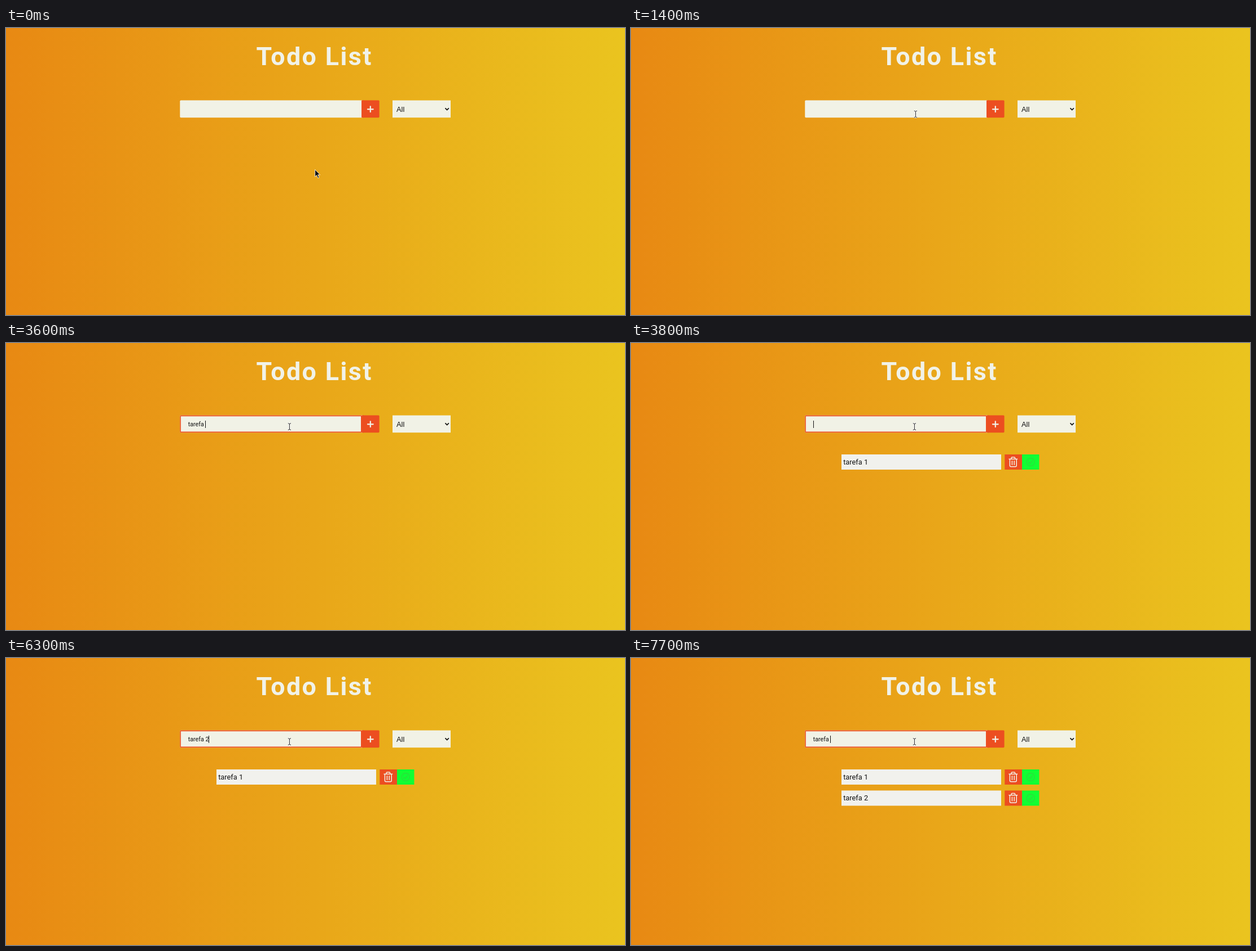
These frames come from a looping animation (1097 by 510 pixels, 8000 ms). An HTML page:

```html
<!DOCTYPE html>
<html lang="en">
<head>
<meta charset="utf-8">
<title>Todo List</title>
<style>
  html, body { margin: 0; width: 100%; height: 100%; overflow: hidden; }
  body { background: linear-gradient(to right, #e88913, #eac41f); }
  svg { display: block; width: 1097px; height: 510px; }
  text { font-family: Roboto, sans-serif; white-space: pre; }
  .title { font-size: 44.8px; font-weight: 700; letter-spacing: 2.4px; fill: #f1f2e8; }
  .field { fill: #f1f2e6; }
  .typed { font-size: 10.667px; fill: #111; }
  .option { font: 12.8px "Liberation Sans", Arial, sans-serif; fill: #111; }
  .label { font-size: 12.8px; fill: #111; }
  .accent { fill: #ec4e20; }
  .line { fill: none; stroke: #f1f2e8; stroke-width: 1.5; stroke-linecap: round; stroke-linejoin: round; }
</style>
</head>
<body>
<svg viewBox="0 0 1097 510">
  <defs>
    <g id="row">
      <rect x="373" width="283" height="27" fill="#f1f1ed"/>
      <rect class="accent" x="662.3" width="30.7" height="27"/>
      <rect x="693" width="30.4" height="27" fill="#11ff33"/>
      <path class="line" d="M670 8.2H684.6M674 8V6.4Q674 5 675.4 5H679.2Q680.6 5 680.6 6.4V8
        M671.4 8.4V19.8Q671.4 21.8 673.4 21.8H681.2Q683.2 21.8 683.2 19.8V8.4M675.4 11.4V18.4M679.2 11.4V18.4"/>
      <g fill="none" stroke="#2ddc3c" stroke-width="1.3" stroke-linecap="round">
        <circle cx="708.2" cy="13.5" r="7"/>
        <path d="M705 13.8L707.4 16.2L711.6 11"/>
      </g>
    </g>
  </defs>

  <text class="title" x="443.6" y="66">Todo List</text>

  <rect class="field" x="308.3" y="128.6" width="325" height="30.6" rx="1.6"/>
  <rect class="accent" x="630.2" y="128.6" width="31.4" height="30.6" rx="1.6"/>
  <rect class="accent" x="630.2" y="128.6" width="4" height="30.6"/>
  <path d="M645.8 139.4V149.2M640.9 144.3H650.7" stroke="#f1f2e8" stroke-width="2.2" stroke-linecap="round"/>

  <rect class="field" x="685" y="128.6" width="103" height="30.6"/>
  <text class="option" x="692" y="148.6">All</text>
  <path d="M778.4 142.3L781.6 145.6L784.8 142.3" fill="none" stroke="#111" stroke-width="1.7"/>

  <rect id="focus" x="309.1" y="129.4" width="320.7" height="29" rx="1" fill="none" stroke="#ec4e20" stroke-width="1.6"/>
  <text id="typed" class="typed" x="322.8" y="148.2"></text>
  <rect id="caret" y="138" width="1" height="13" fill="#111"/>

  <g id="first">
    <use href="#row" y="198"/>
    <text class="label" x="376.2" y="215.8">tarefa 1</text>
  </g>
  <g id="second">
    <use href="#row" y="235.5"/>
    <text class="label" x="376.2" y="253.3">tarefa 2</text>
  </g>

  <path id="arrow" d="M0 0V12.6L2.9 10L5.2 15L7.3 14.1L5.1 9.2H9Z" fill="#111" stroke="#fff" stroke-width=".8"/>
  <g id="beam" fill="none">
    <path d="M-2.6 -5.8Q0 -5.8 0 -4.4Q0 -5.8 2.6 -5.8M0 -4.6V4.6M-2.6 5.8Q0 5.8 0 4.4Q0 5.8 2.6 5.8" stroke="#fff" stroke-width="2.4"/>
    <path d="M-2.6 -5.8Q0 -5.8 0 -4.4Q0 -5.8 2.6 -5.8M0 -4.6V4.6M-2.6 5.8Q0 5.8 0 4.4Q0 5.8 2.6 5.8" stroke="#222" stroke-width="1"/>
  </g>
</svg>
<script>
  const LOOP = 8000;
  const $ = id => document.getElementById(id);
  const [focus, typed, caret, first, second, arrow, beam] =
    ["focus", "typed", "caret", "first", "second", "arrow", "beam"].map($);

  // [start in ms, text in the field]
  const typing = [
    [0, ""], [2400, "t"], [2500, "ta"], [2800, "tare"], [3000, "tarefa"], [3600, "tarefa "],
    [3800, ""], [4800, "t"], [5100, "tar"], [5600, "taref"], [5900, "tarefa "], [6300, "tarefa 2"],
    [6400, ""], [6900, "t"], [7100, "tar"], [7300, "taref"], [7600, "tarefa"], [7700, "tarefa "]
  ];

  const show = (el, on) => el.setAttribute("visibility", on ? "visible" : "hidden");
  const ease = k => k < .5 ? 4 * k ** 3 : 1 - (2 - 2 * k) ** 3 / 2;

  function drawPointer(t) {
    const step = Math.min(9, Math.max(0, Math.floor((t - 700) / 100)));
    const p = ease(step / 9);
    const x = 547.6 - 45.2 * p, y = 251.6 - 103 * p;
    const inField = y < 159;
    show(arrow, !inField);
    show(beam, inField);
    (inField ? beam : arrow).setAttribute("transform", `translate(${x} ${y})`);
  }

  function drawField(t) {
    const text = typing.findLast(([start]) => t >= start)[1];
    if (typed.textContent !== text) typed.textContent = text;
    const width = text ? typed.getComputedTextLength() : 0;
    caret.setAttribute("x", Math.floor(322.8 + width + .2));
    show(focus, t >= 2100);
    show(caret, t >= 2100 && !(t >= 4300 && t < 4800));
  }

  const origin = performance.now();
  function draw(now) {
    const t = Math.max(0, now - origin) % LOOP;
    drawPointer(t);
    drawField(t);
    show(first, t >= 3800);
    show(second, t >= 6400);
    requestAnimationFrame(draw);
  }
  draw(origin);
</script>
</body>
</html>
```
